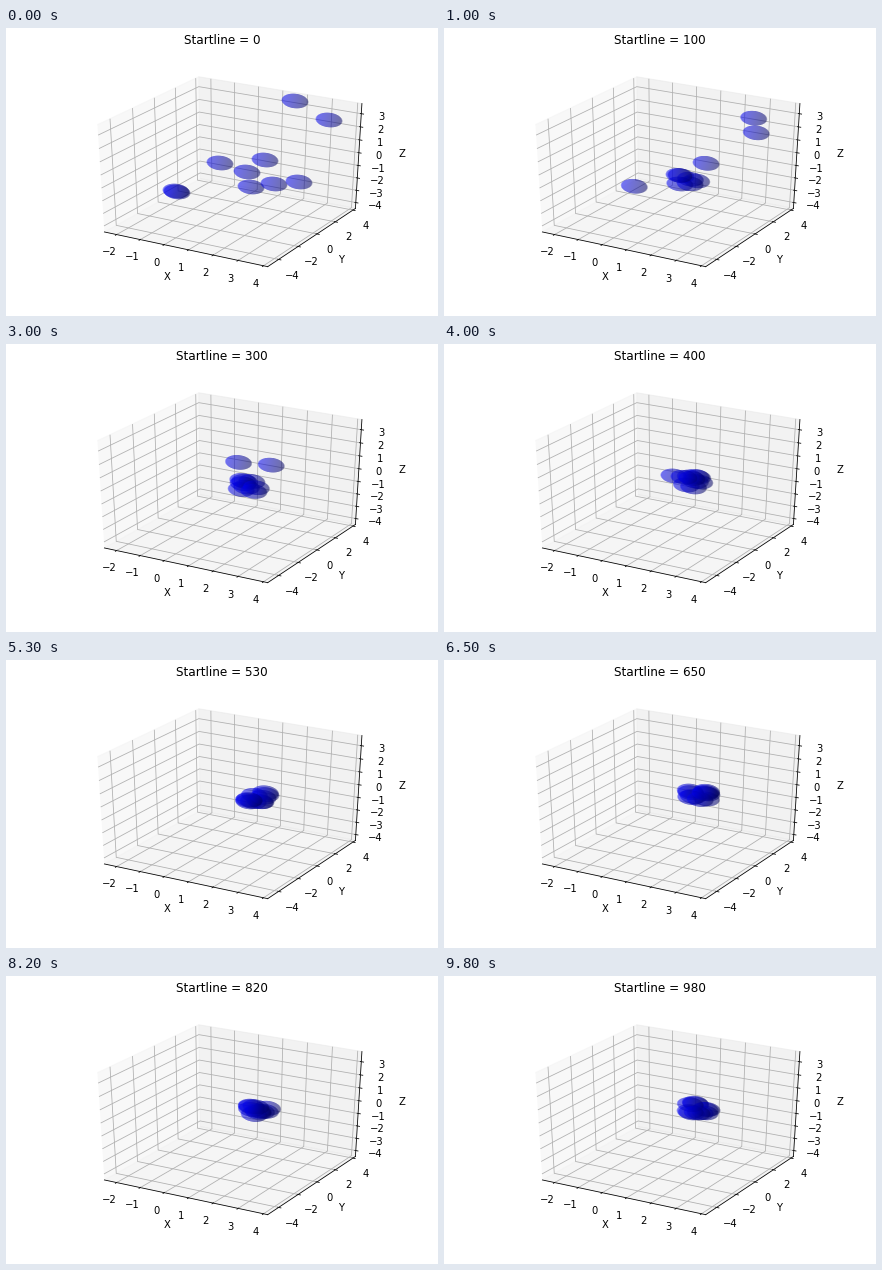
These frames come from a looping animation (432 by 288 pixels, 9.9 s). A matplotlib script:

```python
import numpy as np
import matplotlib.pyplot as plt
from matplotlib.animation import FuncAnimation
from matplotlib.collections import LineCollection
from matplotlib.patches import Polygon

W, H = 432, 288
FRAMES, INTERVAL = 99, 100
plt.rcParams.update({"font.family": "DejaVu Sans", "font.size": 10})

# Camera looking at the centre of a unit box from elev 30, azim -60
EYE_DIST = 10
RIGHT = np.array([np.cos(np.pi / 6), 0.5, 0])
UP = np.array([-0.25, np.sqrt(3) / 4, np.cos(np.pi / 6)])
TO_EYE = np.array([np.sqrt(3) / 4, -0.75, 0.5])
SCALE = np.array([0.775 * W, 0.755 * H]) / 0.185
ORIGIN = np.array([0.125 * W, 0.125 * H]) + 0.095 * SCALE

# Data limits of the three axes and their ticks
MID = np.array([0.82, -0.4, -0.36])
SPAN = np.array([6.42, 9.0, 7.92])
TICKS = [range(-2, 5), range(-4, 5, 2), range(-4, 4)]

LO, HI = -0.5 - 1 / 48, 0.5 + 1 / 48
DELTA = 1 / 12
PER_POINT = 48 / (0.775 * W + 0.755 * H)


def project(p):
    p = np.asarray(p, float)
    depth = EYE_DIST - p @ TO_EYE
    return ORIGIN + SCALE * np.array([p @ RIGHT, p @ UP]) / depth


def path(*points):
    return [project(p) for p in points]


def at(base, index, value):
    p = list(base)
    p[index] = value
    return p


def outward(p, index, points):
    """Push a point away from the centre across its axis."""
    step = points * PER_POINT * DELTA
    return [c if i == index else c + np.copysign(step, c)
            for i, c in enumerate(p)]


fig = plt.figure(figsize=(W / 72, H / 72), dpi=72, facecolor="white")
ax = fig.add_axes([0, 0, 1, 1])


def draw_panes():
    panes = [
        (0.95, [(LO, LO, LO), (LO, HI, LO), (LO, HI, HI), (LO, LO, HI)]),
        (0.90, [(LO, HI, LO), (HI, HI, LO), (HI, HI, HI), (LO, HI, HI)]),
        (0.925, [(LO, LO, LO), (HI, LO, LO), (HI, HI, LO), (LO, HI, LO)]),
    ]
    for grey, corners in panes:
        ax.add_patch(Polygon(path(*corners), closed=False, lw=1, alpha=0.5,
                             facecolor=(grey,) * 3, edgecolor=(grey,) * 3))


def draw_axis(index, name, edge, corner, tick_dir):
    ends = [at(edge, index, LO), at(edge, index, HI)]
    ax.plot(*np.transpose(path(*ends)), color="black", lw=0.8, zorder=2)
    middle = outward(at(edge, index, 0), index, 25)
    ax.text(*project(middle), name, ha="center", va="center")

    grid, marks = [], []
    side = np.sign(edge[tick_dir])
    a, b = (index + 1) % 3, (index + 2) % 3
    for value in TICKS[index]:
        u = (value - MID[index]) / SPAN[index]
        base = at(corner, index, u)
        grid.append(path(at(base, a, -base[a]), base, at(base, b, -base[b])))
        pos = at(edge, index, u)
        marks.append(path(
            at(pos, tick_dir, edge[tick_dir] - 0.1 * side * DELTA),
            at(pos, tick_dir, edge[tick_dir] + 0.2 * side * DELTA)))
        ax.text(*project(outward(pos, index, 11.5)),
                str(value).replace("-", "\u2212"), ha="center", va="top")
    ax.add_collection(LineCollection(grid, colors="#b0b0b0", lw=0.8, zorder=2))
    ax.add_collection(LineCollection(marks, colors="black", lw=0.8, zorder=2))


draw_panes()
back = (LO, HI, LO)
draw_axis(0, "X", (0, LO, LO), back, 1)
draw_axis(1, "Y", (HI, 0, LO), back, 0)
draw_axis(2, "Z", (HI, HI, 0), back, 0)

# Each ball: start x, start y, time to join the swarm, sideways drift
BALLS = [
    (289, 73, 44, 30), (323, 92, 44, 6), (259, 132, 44, 6),
    (170, 163, 24, -22), (171, 164, 9, 0), (214, 135, 9, 0),
    (241, 144, 9, 0), (245, 159, 9, 0), (268, 156, 9, 0), (293, 154, 9, 0),
]
rng = np.random.default_rng(4)
SPEED = rng.uniform(0.12, 0.35, (len(BALLS), 2))
PHASE = rng.uniform(0, 2 * np.pi, (len(BALLS), 2))
JITTER = np.array([9, 5])


def swarm_centre(t):
    times = [0, 10, 22, 40, 65, 98]
    return np.array([np.interp(t, times, [243, 244, 236, 248, 254, 254]),
                     np.interp(t, times, [152, 151, 146, 138, 136, 132])])


def place(ball, t):
    """Fall in from the start point, then hover about the swarm centre."""
    x, y, join, drift = BALLS[ball]
    done = min(t / join, 1)
    offset = (np.array([x, y]) - swarm_centre(0)) * (1 - done)
    offset[0] += drift * np.sin(2 * np.pi * done)
    hover = JITTER * np.sin(SPEED[ball] * t + PHASE[ball])
    px, py = swarm_centre(t) + offset + done ** 2 * hover
    return px, H - py


# Balls of radius 0.5, seen as sheared discs with a lit far and near side
RADII = 0.5 / SPAN
SHAPE = np.array([RIGHT * SCALE[0], UP * SCALE[1]]) * RADII / EYE_DIST
INVERSE = np.linalg.pinv(SHAPE)
FACING = np.cross(*SHAPE)
FACING /= np.linalg.norm(FACING)
LIGHT = np.array([-2, -2, 1]) / 3
OPACITY = 0.32

X0, X1, Y0, Y1 = 140, 350, 100, 250
PX, PY = np.meshgrid(np.arange(X0, X1) + 0.5, np.arange(Y0, Y1) + 0.5)


def render(t):
    blue = np.zeros_like(PX)
    clear = np.ones_like(PX)
    for ball in range(len(BALLS)):
        x, y = place(ball, t)
        offset = np.stack([PX - x, PY - y], axis=-1)
        flat = offset @ INVERSE.T
        rho2 = (flat ** 2).sum(axis=-1)
        bulge = np.sqrt(np.clip(1 - rho2, 0, 1)) * (FACING @ LIGHT)
        alpha = OPACITY * np.clip((1 - np.sqrt(rho2)) * 9 + 0.5, 0, 1)
        for side in (-1, 1):
            lit = np.clip(flat @ LIGHT + side * bulge, -1, 1)
            shade = 0.65 + 0.35 * lit
            blue = blue * (1 - alpha) + alpha * shade
            clear = clear * (1 - alpha)
    cover = 1 - clear
    rgba = np.zeros(PX.shape + (4,))
    rgba[..., 2] = np.clip(blue / np.maximum(cover, 1e-6), 0, 1)
    rgba[..., 3] = cover
    return rgba


balls = ax.imshow(render(0), extent=(X0, X1, Y0, Y1), origin="lower",
                  interpolation="nearest", aspect="auto", zorder=5)
ax.set_xlim(0, W)
ax.set_ylim(0, H)
ax.axis("off")
title = fig.suptitle("Startline = 0", fontsize=12)


def update(i):
    title.set_text(f"Startline = {10 * i}")
    balls.set_data(render(i))
    return balls, title


anim = FuncAnimation(fig, update, frames=FRAMES, interval=INTERVAL,
                     repeat=True, repeat_delay=0, blit=False)
plt.show()
```
